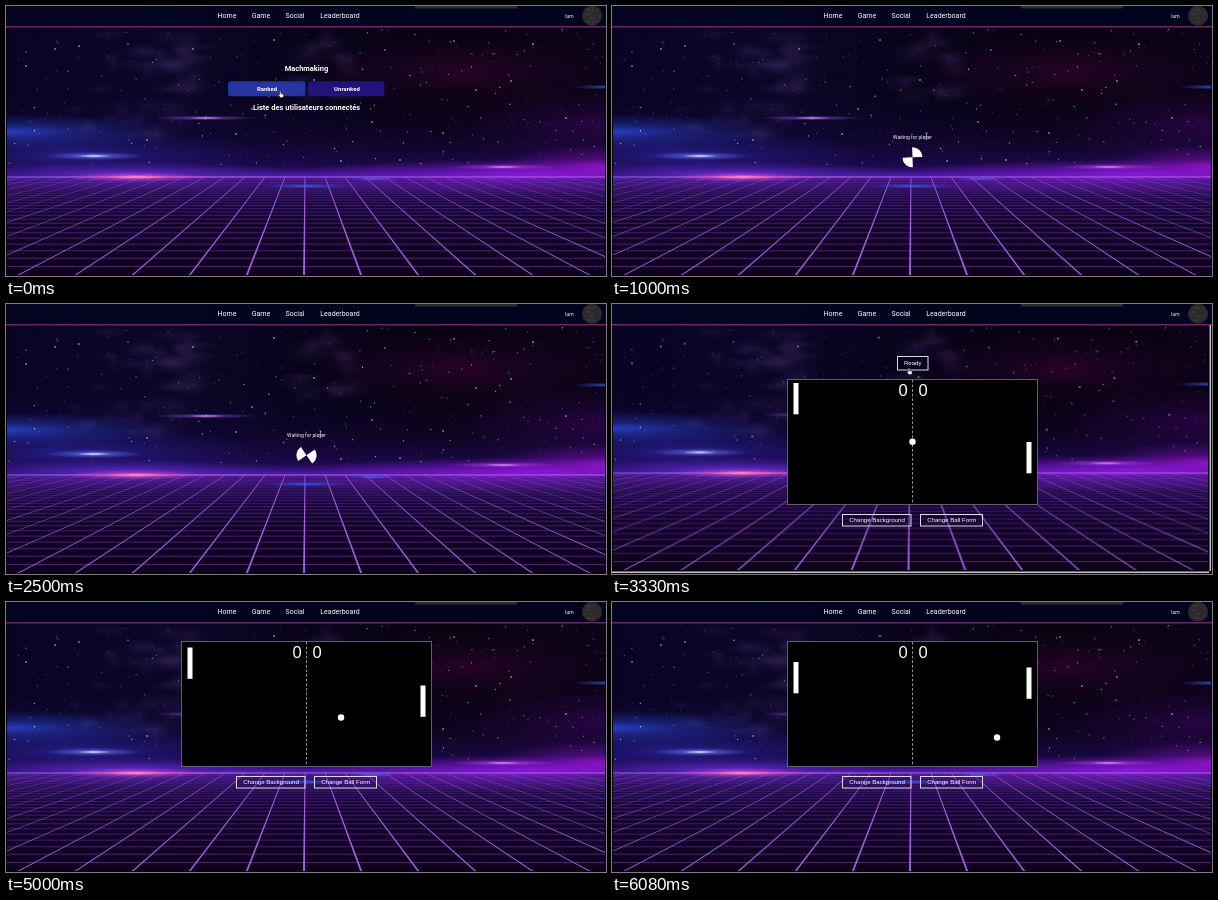
An HTML page with a canvas that plays this animation: 600 px wide and 270 px high, repeating every 6160 ms.

```html
<!DOCTYPE html>
<html lang="fr">
<head>
<meta charset="utf-8">
<title>Pong</title>
<style>
html, body { margin: 0; width: 600px; height: 270px; overflow: hidden; background: #06020f; }
canvas, svg { position: absolute; left: 0; top: 0; }
text { fill: #fff; font: 7px Roboto, sans-serif; text-anchor: middle; }
.title { font-size: 7.5px; font-weight: 700; }
.choice { font-size: 6px; font-weight: 700; }
.small { font-size: 5px; }
.button { font: 6.1px "Liberation Sans", Arial, sans-serif; }
.score { font: 16.5px "Liberation Sans", Arial, sans-serif; }
.frame { fill: rgba(10, 4, 40, .12); stroke: #dcd8e8; }
.white { fill: #fff; }
</style>
</head>
<body>
<canvas id="sky" width="600" height="270"></canvas>
<svg width="600" height="270" viewBox="0 0 600 270">
  <rect width="600" height="20" fill="#020520" fill-opacity=".9"/>
  <rect y="20" width="600" height="1.5" fill="#6d2762"/>
  <rect x="409" width="102" height="2.5" fill="#2b2a2c"/>
  <text x="221" y="12.3">Home</text>
  <text x="255" y="12.3">Game</text>
  <text x="289" y="12.3">Social</text>
  <text x="334" y="12.3">Leaderboard</text>
  <text class="small" x="563.5" y="11.6">lum</text>
  <circle cx="586" cy="9.7" r="10" fill="#2d2a2c"/>
  <path d="M581 4h7M580 8h4M584 12h5M581 16h7" stroke="#5a5450" stroke-width=".8" stroke-dasharray="1.5 1"/>

  <g id="menu">
    <text class="title" x="300.5" y="65.3">Machmaking</text>
    <rect x="222" y="75.3" width="77.5" height="15" rx="3" fill="#2636a4"/>
    <rect x="223.5" y="76.8" width="74.5" height="12" rx="2" fill="none" stroke="#1d2480" stroke-width=".8" stroke-dasharray="1 1"/>
    <rect x="302" y="75.3" width="76.5" height="15" rx="3" fill="#22137c"/>
    <text class="choice" x="261" y="85">Ranked</text>
    <text class="choice" x="341" y="85">Unranked</text>
    <text class="title" x="300.5" y="104">Liste des utilisateurs connectés</text>
  </g>

  <g id="wait">
    <text class="small" x="300.5" y="132.8">Waiting for player</text>
    <path id="spinner" class="white" d="M0 0L-7.1 -7.1A10 10 0 0 1 7.1 -7.1ZL7.1 7.1A10 10 0 0 1 -7.1 7.1Z"/>
  </g>

  <g id="ready">
    <path d="M0 268.3H597M598.3 21V267" stroke="#c9c6cf" stroke-width="1.4"/>
    <rect class="frame" x="285.5" y="52.5" width="30.5" height="13.5"/>
    <text class="button" x="300.7" y="61.3">Ready</text>
  </g>

  <g id="game">
    <rect x=".5" y=".5" width="250" height="125" stroke="#77747e" stroke-width=".8"/>
    <path d="M125.5 1V125" stroke="#a5a5aa" stroke-width=".9" stroke-dasharray="2.6 2"/>
    <text class="score" x="116" y="16.6">0</text>
    <text class="score" x="136" y="16.6">0</text>
    <rect id="left" class="white" x="6.5" width="5" height="31.3"/>
    <rect id="right" class="white" x="239.5" width="5" height="31.3"/>
    <circle id="ball" class="white" r="3.2"/>
    <rect class="frame" x="55.5" y="135.5" width="68.5" height="11.5"/>
    <rect class="frame" x="133.5" y="135.5" width="62" height="11.5"/>
    <text class="button" x="90" y="143.4">Change Background</text>
    <text class="button" x="164.7" y="143.4">Change Ball Form</text>
  </g>

  <path id="hand" d="M-1.2 -3V1L-2.2 .2L-2.6 1L-.8 3.6H2.2L2.8 .4L0 -.4V-3Z" fill="#fff" stroke="#111" stroke-width=".5"/>
  <path id="beam" d="M-1 -3.5H1M0 -3.5V2.5M-1 2.5H1" stroke="#b9b6c4" stroke-width=".8"/>
</svg>
<script>
const $ = id => document.getElementById(id);
const LOOP = 6160, MATCH = 830, FOUND = 2580, PLAY = 4670, SERVE = 4255, SPIN = 1200;
const HORIZON = 171, VANISH = 117.5;
const sky = $('sky'), c = sky.getContext('2d');

let seed = 7;
const rnd = () => (seed = seed * 16807 % 2147483647) / 2147483647;

// Soft elliptical light; rgb is a "r,g,b" string
function glow(x, y, rx, ry, rgb, alpha) {
  c.save();
  c.translate(x, y);
  c.scale(rx, ry);
  const g = c.createRadialGradient(0, 0, 0, 0, 0, 1);
  g.addColorStop(0, `rgba(${rgb},${alpha})`);
  g.addColorStop(.4, `rgba(${rgb},${alpha * .45})`);
  g.addColorStop(1, `rgba(${rgb},0)`);
  c.fillStyle = g;
  c.fillRect(-1, -1, 2, 2);
  c.restore();
}

function shade(x0, y0, x1, y1, top, height, ...colors) {
  const g = c.createLinearGradient(x0, y0, x1, y1);
  colors.forEach((color, i) => g.addColorStop(i / (colors.length - 1), color));
  c.fillStyle = g;
  c.fillRect(0, top, 600, height);
}

function star(x, y, r, alpha) {
  c.fillStyle = `rgba(235,220,255,${alpha})`;
  c.beginPath();
  c.arc(x, y, r, 0, 7);
  c.fill();
}

function clouds(count, x, y, width, height) {
  for (let i = 0; i < count; i++)
    glow(x + rnd() * width, y + rnd() * height, 8 + rnd() * 20, 4 + rnd() * 10, '90,62,130', .17);
}

function drawSky() {
  shade(0, 0, 600, 0, 0, HORIZON, '#080424', '#0b0628', '#08031a', '#07020f', '#0b0318');
  shade(0, 90, 0, HORIZON, 90, HORIZON - 90, 'rgba(30,10,85,0)', 'rgba(30,10,85,.25)', 'rgba(40,12,105,.8)');
  glow(455, 65, 150, 40, '85,5,75', .4);
  glow(590, 120, 150, 40, '75,5,110', .4);
  clouds(30, 95, 28, 100, 60);
  clouds(16, 290, 28, 60, 65);
  clouds(14, 60, 100, 110, 30);
  glow(0, 126, 170, 18, '45,75,225', .8);
  glow(70, 148, 190, 24, '50,50,205', .5);
  glow(120, 168, 190, 13, '120,50,235', .65);
  glow(520, 168, 230, 15, '150,20,225', .8);
  glow(600, 161, 120, 22, '170,20,225', .7);
  glow(300, 170, 320, 10, '95,35,210', .6);

  for (let i = 0; i < 300; i++) star(rnd() * 600, 22 + rnd() * 140, .3 + rnd() * .4, .2 + rnd() * .6);
  [[73, 40], [49, 43], [246, 103], [308, 74], [470, 84], [335, 155], [230, 128], [187, 43], [268, 34],
   [394, 154], [505, 75], [448, 35], [527, 38], [20, 60], [437, 127], [141, 134], [366, 116], [560, 112]]
    .forEach(([x, y]) => star(x, y, .8, .9));

  glow(88, 150, 50, 4, '120,140,255', .9);
  glow(88, 150, 17, 1.8, '255,235,255', 1);
  glow(200, 112, 52, 2.4, '150,90,245', .9);
  glow(200, 112, 18, 1.1, '245,190,255', .9);
  glow(497, 161, 55, 3, '205,80,255', .9);
  glow(497, 161, 18, 1.3, '255,210,255', .9);
  glow(600, 81, 34, 2.5, '75,100,255', .8);
}

function drawFloor() {
  shade(0, HORIZON, 0, 270, HORIZON, 99, '#35106e', '#1b0740', '#14042c', '#110322', '#0e021a');
  glow(500, 172, 260, 18, '145,30,235', .55);
  glow(120, 172, 180, 13, '105,50,230', .45);

  c.strokeStyle = 'rgba(145,75,215,.6)';
  for (let i = 0; i < 29; i++) {
    const y = VANISH + 152.5 / (1 + .066 * i);
    c.lineWidth = .3 + (y - HORIZON) / 180;
    c.beginPath();
    c.moveTo(0, y);
    c.lineTo(600, y);
    c.stroke();
  }
  const g = c.createLinearGradient(0, HORIZON, 0, 270);
  g.addColorStop(0, '#b45df0');
  g.addColorStop(.5, '#a75fe6');
  g.addColorStop(1, '#9b63dc');
  c.fillStyle = g;
  for (let i = -16; i <= 16; i++) {
    const a = 299 + i * 20, b = 298 + i * 57.5;
    c.beginPath();
    c.moveTo(a - .35, HORIZON);
    c.lineTo(a + .35, HORIZON);
    c.lineTo(b + 1, 270);
    c.lineTo(b - 1, 270);
    c.fill();
  }
  shade(0, 0, 600, 0, HORIZON - .6, 1.2, '#7055df', '#d660df', '#9155e5', '#a950ef', '#c047f2');
  glow(130, 171, 70, 5, '255,85,185', .9);
  glow(130, 171, 35, 2, '255,175,190', .8);
  glow(300, 180, 45, 2.5, '50,100,255', .9);
  glow(368, 173, 24, 2, '70,110,255', .9);
  c.fillStyle = '#08020f';
  c.fillRect(0, 269, 600, 1);
  c.fillRect(0, 20, 1, 250);
  c.fillRect(599, 20, 1, 250);
}

const show = (id, on) => $(id).setAttribute('display', on ? 'inline' : 'none');
const move = (id, x, y, turn = 0) => $(id).setAttribute('transform', `translate(${x} ${y}) rotate(${turn})`);

// Linear path through [time, value] points, held at both ends
function track(t, ...points) {
  let [t0, v0] = points[0];
  for (const [t1, v1] of points) {
    if (t < t1) return t <= t0 ? v0 : v0 + (v1 - v0) * (t - t0) / (t1 - t0);
    [t0, v0] = [t1, v1];
  }
  return v0;
}

// Same curve as CSS cubic-bezier(x1, y1, x2, y2)
function bezier(x, x1, y1, x2, y2) {
  const at = (s, a, b) => 3 * (1 - s) ** 2 * s * a + 3 * (1 - s) * s * s * b + s ** 3;
  let low = 0, high = 1;
  for (let i = 0; i < 20; i++) {
    const mid = (low + high) / 2;
    if (at(mid, x1, x2) < x) low = mid; else high = mid;
  }
  return at(low, y1, y2);
}

// Hourglass: two and a half turns speeding up, then as many slowing down
function spin(t) {
  const p = t / SPIN % 1 * 2;
  return 900 * (p < 1 ? bezier(p, .55, .055, .675, .19) : 1 + bezier(p - 1, .215, .61, .355, 1));
}

function draw() {
  const t = performance.now() % LOOP;
  const menu = t < MATCH, wait = !menu && t < FOUND, play = t >= PLAY;
  const ready = t >= FOUND && !play;
  show('menu', menu);
  show('wait', wait);
  show('ready', ready);
  show('game', ready || play);

  // Scrollbars shrink the page while the ready button is shown
  sky.style.width = ready ? '597px' : '600px';
  sky.style.height = ready ? '267px' : '270px';

  if (wait) move('spinner', 300.5, 151.3, spin(t - MATCH));
  move('game', 175, play ? 39 : 75);

  const run = play ? (t - SERVE) / 1000 : 0;
  move('ball', 125.5 + 46.3 * run, 62.7 + 18.5 * run);
  const time = play ? t : 0;
  $('left').setAttribute('y', track(time, [4670, 4], [4850, 4.5], [5000, 6.5], [6080, 21], [LOOP, 22]));
  $('right').setAttribute('y', track(time, [4255, 63], [5000, 44.5], [6080, 26.5], [LOOP, 25]));

  const x = track(t, [MATCH, 275], [1000, 314.5], [FOUND, 314.5], [2830, 297.5]);
  const y = track(t, [MATCH, 88], [1000, 130.5], [FOUND, 130.5], [2830, 67]);
  show('hand', menu || ready);
  show('beam', wait);
  move('hand', x, y);
  move('beam', x, y);
  requestAnimationFrame(draw);
}

drawSky();
drawFloor();
draw();
</script>
</body>
</html>
```
